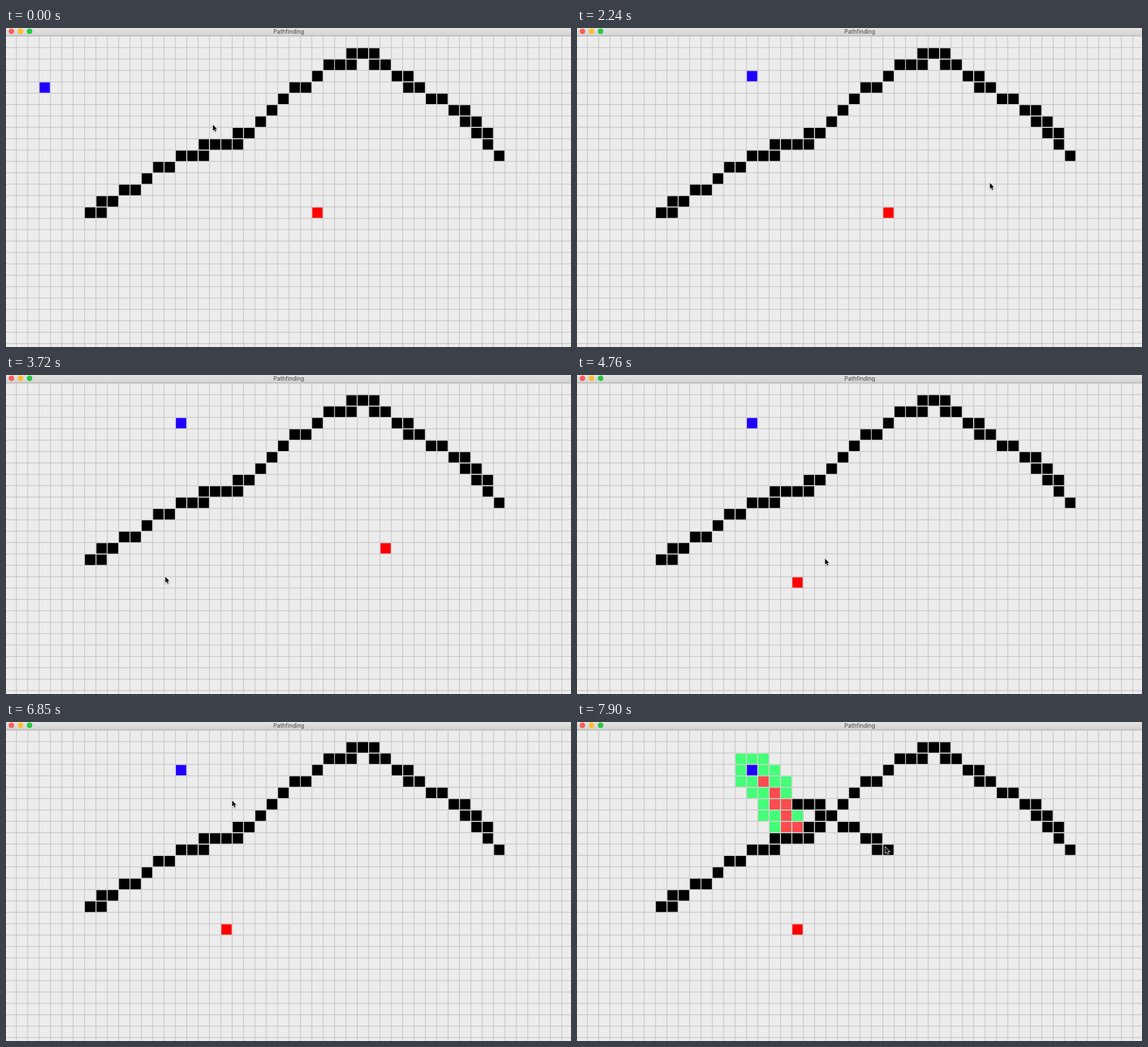
These frames come from a looping animation (997x562 px, 8000 ms). An HTML page with a canvas:

```html
<!DOCTYPE html>
<html lang="en">
<head>
<meta charset="utf-8">
<title>Pathfinding</title>
<style>
  html, body { margin: 0; width: 100%; height: 100%; overflow: hidden; background: #ececec; }
  canvas { display: block; }
</style>
</head>
<body>
<canvas id="stage" width="997" height="562"></canvas>
<script>
const ctx = document.getElementById('stage').getContext('2d');
const LOOP = 8000, W = 997, H = 562;
const PITCH = 20.05, LEFT = 18.3, TOP = 14.5, TICK = 150;

// Cells touched by a stroke through the points, sampled twice per column
function trace(points) {
  const cells = [];
  const end = points[points.length - 1][0];
  for (let x = points[0][0] + 0.25; x < end; x += 0.5) {
    const i = points.findIndex(p => p[0] > x);
    const [[x0, y0], [x1, y1]] = points.slice(i - 1, i + 1);
    cells.push([Math.floor(x), Math.floor(y0 + (y1 - y0) * (x - x0) / (x1 - x0))]);
  }
  return cells;
}

const ridge = trace([
  [6, 15.9], [7.4, 15], [11, 13], [12.1, 12], [13.8, 11], [19.4, 9], [20.8, 8],
  [24.1, 5], [25.9, 4], [27.1, 3], [29.5, 2], [30.5, 1.2], [31.5, 2],
  [39.4, 7], [42.4, 10.21]
]);
const branch = trace([[18, 6.1], [20.5, 7], [26.5, 10.53]]);
const blocked = new Set([...ridge, ...branch].map(String));
const visits = [[14, 3], [15, 4], [16, 5], [16, 6], [17, 6], [17, 7], [17, 8], [18, 8]];

// Pointer moves: first step, last step (ms), end point
const moves = [
  [150, 470, 306, 92], [1510, 1940, 787, 246], [2240, 2530, 670, 299],
  [3270, 3720, 281, 355], [4170, 4320, 388, 361], [4760, 5060, 487, 285],
  [5200, 5650, 251, 207], [5800, 6550, 399, 138], [7000, 7150, 544, 220]
];

function pointerAt(t) {
  let x = 365, y = 170;
  for (const [first, last, endX, endY] of moves) {
    if (t < first) break;
    const gaps = Math.round((last - first) / TICK);
    const step = Math.min(gaps, Math.floor((t - first) / (last - first) * gaps + 0.05));
    const p = Math.sin((step + 1) / (gaps + 1) * Math.PI / 2);
    x += (endX - x) * p;
    y += (endY - y) * p;
  }
  return [x, y];
}

function cell([col, row], color) {
  ctx.fillStyle = color;
  ctx.fillRect(LEFT + col * PITCH + 0.9, TOP + row * PITCH + 1.1, PITCH - 1.9, PITCH - 1.9);
}

function grid() {
  ctx.fillStyle = '#ececec';
  ctx.fillRect(0, 0, W, H);
  ctx.fillStyle = '#c8c8c8';
  for (let x = LEFT; x < W; x += PITCH) ctx.fillRect(x - 0.7, 14, 1.4, H);
  for (let y = TOP; y < H; y += PITCH) ctx.fillRect(0, y - 0.7, W, 1.4);
}

function titleBar() {
  const shade = ctx.createLinearGradient(0, 0, 0, 13);
  shade.addColorStop(0, '#e4e4e4');
  shade.addColorStop(1, '#d3d3d3');
  ctx.fillStyle = shade;
  ctx.fillRect(0, 0, W, 13);
  ctx.fillStyle = '#b8b8b8';
  ctx.fillRect(0, 13, W, 1);
  ['#ff5f57', '#ffbd2e', '#28c940'].forEach((color, i) => {
    ctx.fillStyle = color;
    ctx.beginPath();
    ctx.arc(9.6 + i * 16, 5.8, 4.9, 0, 7);
    ctx.fill();
  });
  ctx.fillStyle = '#444';
  ctx.font = '10.1px Inter, Roboto, sans-serif';
  ctx.textAlign = 'center';
  ctx.fillText('Pathfinding', 499, 9.6);
}

// Neighbours open up unless a wall sits on the cell or on a corner being cut
function expand([col, row]) {
  const free = (c, r) => !blocked.has(c + ',' + r);
  for (let dy = -1; dy <= 1; dy++)
    for (let dx = -1; dx <= 1; dx++)
      if (free(col + dx, row + dy) && free(col + dx, row) && free(col, row + dy))
        cell([col + dx, row + dy], '#44ff78');
}

const arrow = new Path2D('M0 0V10.3L2.3 8.2L4 12L5.6 11.3L4 7.6H7.1Z');
function cursor(x, y) {
  ctx.save();
  ctx.translate(x + 0.2, y + 0.5);
  ctx.lineWidth = 1.6;
  ctx.strokeStyle = '#fff';
  ctx.shadowColor = 'rgba(0,0,0,.35)';
  ctx.shadowBlur = 2;
  ctx.shadowOffsetY = 1;
  ctx.stroke(arrow);
  ctx.shadowColor = 'transparent';
  ctx.fillStyle = '#000';
  ctx.fill(arrow);
  ctx.restore();
}

function draw(now) {
  const t = now % LOOP;
  const [x, y] = pointerAt(t);
  grid();

  const seen = t < 7600 ? [] : visits.slice(0, 2 + 3 * Math.floor((t - 7600) / TICK));
  seen.forEach(expand);
  seen.forEach(c => cell(c, '#ff4b50'));

  // The new branch follows the pointer
  const reach = t < 7000 ? 0 : (x - LEFT) / PITCH;
  ridge.concat(branch.filter(c => c[0] <= reach)).forEach(c => cell(c, '#000'));

  cell(t < 2830 ? [26, 15] : t < 4460 ? [32, 14] : [18, 17], '#f00');
  cell(t < 1360 ? [2, 4] : [14, 3], '#2000ff');
  titleBar();
  cursor(x, y);
  requestAnimationFrame(draw);
}
requestAnimationFrame(draw);
</script>
</body>
</html>
```
